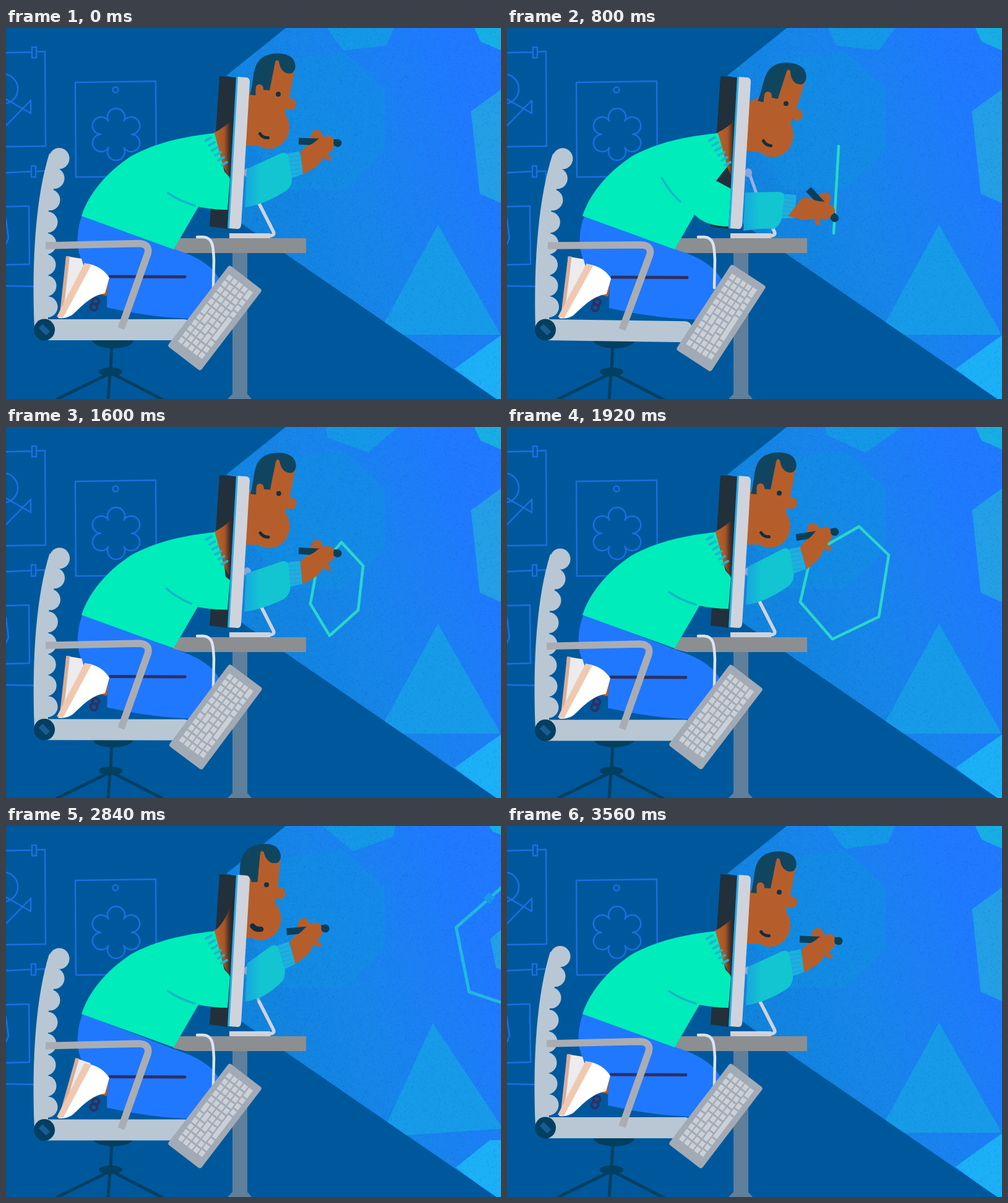
An HTML page with a canvas for the animation above (3.6 s loop, 800 by 600 pixels).

```html
<!DOCTYPE html>
<html lang="en">
<head>
<meta charset="utf-8">
<title>Drawing through the screen</title>
<style>
html, body { margin: 0; width: 100%; height: 100%; overflow: hidden; background: #00589c; }
canvas { display: block; }
</style>
</head>
<body>
<canvas id="stage" width="800" height="600"></canvas>
<script>
const LOOP = 3600, RAD = Math.PI / 180;
const stage = document.getElementById('stage').getContext('2d');
let c = stage;

const C = {
  wall: '#00589c', sketch: '#1a6fe0', navy: '#033f60', chair: '#b8c7d3', arm: '#a9adb3',
  skin: '#b65e2b', hair: '#104560', green: '#00ecba', jeans: '#2078ff', seam: '#302f63',
  teal: '#12c5d0', cuff: '#1bb0de', ink: '#2bd6c9', slab: '#d0d3db', panel: '#22303b', pen: '#0b3f59'
};

const clamp = x => Math.max(0, Math.min(1, x));
const mix = (a, b, u) => a + (b - a) * u;
const smooth = x => { x = clamp(x); return x * x * (3 - 2 * x); };

// Each key is [time, ...values]; values ease from key to key.
function track(keys, t) {
  let i = 0;
  while (i < keys.length - 2 && t >= keys[i + 1][0]) i++;
  const a = keys[i], b = keys[i + 1], u = smooth((t - a[0]) / (b[0] - a[0]));
  return a.slice(1).map((v, n) => mix(v, b[n + 1], u));
}

const shape = (d, color) => { c.fillStyle = color; c.fill(new Path2D(d)); };
function line(d, color, width, cap = 'round') {
  c.strokeStyle = color; c.lineWidth = width; c.lineCap = cap; c.lineJoin = 'round';
  c.stroke(new Path2D(d));
}
const toPath = pts => 'M' + pts.map(p => p.join(' ')).join('L') + 'Z';
function oval(x, y, rx, ry, color) {
  c.fillStyle = color; c.beginPath(); c.ellipse(x, y, rx, ry, 0, 0, 7); c.fill();
}
function ring(x, y, rx, ry, color, width) {
  c.strokeStyle = color; c.lineWidth = width; c.beginPath(); c.ellipse(x, y, rx, ry, 0, 0, 7); c.stroke();
}
function hexagon(x, y, r, deg) {
  return Array.from({ length: 6 }, (_, i) =>
    [x + r * Math.cos((deg + 60 * i) * RAD), y + r * Math.sin((deg + 60 * i) * RAD)]);
}
function placed(x, y, deg, ox, oy, draw) {
  c.save(); c.translate(x, y); c.rotate(deg * RAD); c.translate(-ox, -oy); draw(); c.restore();
}
function layer(draw) {
  const sheet = document.createElement('canvas');
  sheet.width = 800; sheet.height = 600;
  const old = c; c = sheet.getContext('2d'); draw(); c = old;
  return sheet;
}
let seed = 7;
const random = () => (seed = seed * 16807 % 2147483647) / 2147483647;

const BEAM = new Path2D('M452 0L356 77L372 81L364 305L800 605V0Z');
const HEAD_AREA = new Path2D('M340 0H520V240H366L380 80H340Z');

const wall = layer(() => {
  c.fillStyle = C.wall; c.fillRect(0, 0, 800, 600);
  const draw = d => line(d, C.sketch, 2.5);
  draw('M0 40L41 39M50 38.5L63 38L64 191L0 192M42 31H49V48H42Z');
  draw('M0 75A24 24 0 0 1 0 122M0 158L40 117V138L0 115');
  draw('M112 88L242 86L243 240L113 241Z');
  draw('M0 234L40 232M49 232L63 231V262M41 223H48V241H41Z');
  draw('M0 289L37 288L38 382L0 383M0 309L4 340L0 349M0 417L46 418');
  ring(177, 100, 4.5, 4.5, C.sketch, 2.5);
  const notches = hexagon(178, 172, 25, -120);
  draw('M' + notches[5].join(' ') + notches.map(p => 'A14 14 0 1 1 ' + p.join(' ')).join(''));
});

const beam = layer(() => {
  c.clip(BEAM);
  const g = c.createLinearGradient(390, 290, 760, 160);
  g.addColorStop(0, '#1184dc'); g.addColorStop(.45, '#1785ea'); g.addColorStop(1, '#2079ff');
  c.fillStyle = g; c.fillRect(0, 0, 800, 600);
  c.globalAlpha = .5;
  shape('M430 55L545 37L612 98V198L548 262L450 262L400 190Z', '#1192e2');
});

const grain = layer(() => {
  c.clip(BEAM);
  for (let i = 0; i < 26000; i++) {
    const x = 360 + 440 * Math.pow(random(), 1.5), y = 600 * random();
    c.fillStyle = random() < .5 ? 'rgba(0,70,190,.13)' : 'rgba(40,180,235,.13)';
    c.fillRect(x, y, 1.5, 1.5);
  }
});

// time, lean, head x, head y, head turn, wrist x, wrist y, wrist turn, sleeve y, hand turn, chair drop
const POSES = [
  [0, 0, 0, 0, 0, 478, 218, -8, 228, 0, 0],
  [340, .2, 2, 2, 1, 470, 203, -8, 228, 18, 0],
  [700, 1, 10, 15, 6.5, 463, 308, 9, 272, 45, 0],
  [800, 1, 9.5, 14, 6.5, 466, 289, 8, 266, 45, 0],
  [1280, .3, 1.5, 1, .5, 476, 259, 2, 248, 13, 0],
  [1920, 0, 0, 0, 0, 479, 212, -9, 226, -11, 2.5],
  [2320, 0, 0, 0, 0, 478, 217, -9, 227, -17.5, 3.5],
  [2840, 0, -17.5, -11, -6, 463, 205, -16, 222, -7.5, 3.5],
  [3560, 0, 0, 0, 0, 478, 218, -8, 228, 0, 0],
  [3600, 0, 0, 0, 0, 478, 218, -8, 228, 0, 0]
];

// Corners of the drawn outline, clockwise from the top.
const OUTLINE = [
  [820, 536, 191, 535, 225, 530, 300, 528, 332, 530, 300, 535, 225],
  [1280, 515, 212, 537, 242, 537, 285, 520, 332, 510, 289, 511, 262],
  [1920, 569, 161, 617, 207, 601, 307, 526, 343, 474, 283, 492, 205],
  [2320, 583, 145, 670, 195, 670, 296, 583, 346, 496, 296, 496, 195]
];

// Flight of the finished outline: time, x, y, radius, turn
const FLIGHT = [
  [2360, 583, 245.5, 100.5, 210],
  [2840, 828, 198, 106, 198.6],
  [3300, 874, 189, 134, 203.9]
];

function drawBeam(t) {
  c.drawImage(beam, 0, 0);
  c.save(); c.clip(BEAM);
  const push = t < 2840 ? smooth((t - 2380) / 460) : 1 - smooth((t - 2840) / 640);
  shape(toPath(hexagon(573, -28, 70, 53 + t / 60)), '#1597e8');
  placed(705, 437, -4 * push, 705, 437, () => shape('M698 318L601 496H799.5Z', '#179be8'));
  shape(`M${725 + 2 * push} ${551 + push}L${790 - 8 * push} ${504 + 4 * push}L815 ${487 + 21 * push}V620Z`, '#1cb0f7');
  placed(18 * push, -14 * push, 0, 0, 0, () => shape('M755 -4L767 22L802 37V-4Z', '#17aee4'));
  if (t < 2760) {
    const away = 170 * smooth((t - 2360) / 360);
    shape(toPath(hexagon(874 + away, 189, 134, 203.9)), '#239fe6');
  }
  if (t >= 2360) {
    const [x, y, r, turn] = track(FLIGHT, t), fill = clamp((t - 2640) / 445);
    if (fill) shape(toPath(hexagon(x, y, r * fill, turn)), '#239fe6');
    c.globalAlpha = 1 - smooth((t - 2900) / 300);
    line(toPath(hexagon(x, y, r, turn)), t < 2600 ? C.ink : '#20bade', 5);
    c.globalAlpha = 1;
    if (t > 2740 && t < 2940) {
      placed(781, 116, 42, 0, 0, () => { c.fillStyle = '#179be8'; c.fillRect(-6, -6, 13, 13); });
    }
  }
  c.drawImage(grain, 0, 0);
  c.restore();

  if (t >= 340 && t < 820) {
    const u = smooth((t - 340) / 360);
    line(`M536 191L${mix(536, 528, u)} ${mix(191, 332, u)}`, C.ink, 4.5);
  } else if (t >= 820 && t < 2360) {
    const p = track(OUTLINE, t);
    line(toPath([0, 2, 4, 6, 8, 10].map(i => [p[i], p[i + 1]])), C.ink, 4.5);
  }
}

function drawBase() {
  oval(173, 505, 33, 13, C.navy);
  line('M171 512L169 552M169 558L83 600M168 558L165 602M170 558L255 602', C.navy, 5);
  oval(169, 556, 19, 7, C.navy);
}

function drawChair() {
  shape('M70 203C49 270 41 370 46 488H68V300L86 220Z', C.chair);
  [[86, 211], [78, 243], [71, 278], [67, 314], [65, 349], [64, 383], [65, 417], [67, 451]]
    .forEach(([x, y]) => oval(x, y, 16.5, 17, C.chair));
  shape('M48 471H288Q300 472 300 488Q300 505 288 505H62Z', C.chair);
  oval(62, 488, 17, 17.5, C.navy);
  line('M56 482L68 494', '#185c96', 9, 'butt');
}

function drawDesk() {
  shape('M366 360H390V592L397 600H358L366 592Z', '#5f7f9b');
  shape('M281 340H485V364H290L270 359Z', '#8b8f92');
  line('M392 236L409 284', '#8fb2ec', 5);
  oval(390, 234, 6, 7, '#8aa6da');
  line('M409 284L432 329Q435 335 427 336H364', C.slab, 5.5);
  c.fillStyle = C.slab; c.fillRect(361, 332, 66, 8);
}

function drawHead([, x, y, turn], sway) {
  c.save(); c.clip(HEAD_AREA);
  placed(430 + x, 120 + y, turn, 430, 120, () => {
    shape('M397 100L424 62L438 48L467 66L457.5 114L450 140L440 190H380V112Z', C.skin);
    oval(425, 160, 33, 35.5, C.skin);
    oval(460, 123, 9, 9.5, C.skin);
    shape('M394 108C400 92 398 66 408 54C419 38 452 37 463 49C470 58 469 69 462 73C451 76 443 68 441 54' +
      'Q437 49 435 56L426 101L415 100L404 109Z', C.hair);
    shape('M403.5 110V98Q404 91 410 91Q416 92 416 99L417 110Z', C.skin);
    oval(440, 107, 4, 4, '#123247');
    line('M410.5 171Q415 178 423.5 177.5', '#122e3d', 5 + sway * .2);
  });
  c.restore();
}

function drawBody(pose, swing, sway) {
  const lean = pose[0], drop = pose[9];
  shape('M345 78L372 80L358 325L329 321Z', C.panel);

  const shade = c.createLinearGradient(342, 0, 366, 0);
  shade.addColorStop(0, C.skin); shade.addColorStop(.45, '#a85627');
  shade.addColorStop(.8, '#3f2e2a'); shade.addColorStop(1, '#22282e');
  placed(4 * lean, 0, 0, 0, 0, () =>
    shape(`M335 170Q355 160 ${367 + sway * .1} ${146 - sway * 2}L366 160L361 243L350 222Z`, shade));

  placed(2 * lean, drop + lean, 0, 0, 0, () => {
    shape('M124 300C111 333 114 365 127 384L164 402L163 452C210 462 250 469 315 471L346 408C335 386 312 370 270 357Z', C.jeans);
    line('M168 402L289 402.5', C.seam, 5);
  });

  const pit = [mix(311, 303, lean), mix(289, 302, lean)], low = mix(294, 321, swing * swing);
  shape(`M122 304C134 268 161 235 201 208C242 185 290 175 ${337 + 4 * lean} 170` +
    `L${mix(353, 356, swing)} ${mix(232, 224, swing)}L${mix(360, 338, swing)} ${mix(240, 247, swing)}L362 ${mix(244, 260, swing)}` +
    `L358 ${low}Q${mix(335, 322, lean)} ${low} ${pit.join(' ')}L271 358Z`, C.green);
  const fx = mix(262, 250, swing), fy = mix(267, 242, swing), gx = mix(305, 280, swing), gy = mix(287, 281, swing);
  line(`M${fx} ${fy}Q${(fx + gx) / 2 - 3} ${(fy + gy) / 2 + 3} ${gx} ${gy}`, '#16b6cb', 3.5);
  for (let i = 0; i < 6; i++) {
    const x = 323 + 5 * i + 4 * lean, y = 182 + 8 * i;
    line(`M${x} ${y}l9 -5`, '#1cb4d5', 4);
  }
}

function drawShoes(sway) {
  shape('M157 402L166 405L163 433L153 431Z', C.skin);
  placed(88, 462, sway * .55, 88, 462, () => {
    shape('M97 369L122 373L128 392L92 448Z', '#ecebed');
    shape('M97 369L103 369L95 440L87 462Z', '#d8ad99');
  });
  shape('M130 381C147 383 160 392 167 404L160 429C135 433 119 454 107 464Q96 471 84 469Z', '#fff');
  shape('M127 380L138 383L92 469L82 467Z', '#f0c8b0');
  ring(145, 442, 5.5, 5, C.seam, 4);
  ring(142, 451, 5.5, 5.5, C.seam, 4);
}

function drawScreen() {
  shape('M372 79H377L364 324H358Z', '#27aee6');
  shape('M375 79L389 80Q394 81 394 87L380 319Q379 325 374 325L361 324Z', C.slab);
}

function drawKeyboard(lean) {
  line('M309 338H319C334 339 335 352 336 375L335 420', '#dce3f1', 4.5);
  placed(337.5 + 8.5 * lean, 469, 127.4 - 4.4 * lean, 0, 0, () => {
    c.fillStyle = '#a2abb5';
    c.beginPath(); c.roundRect(-82.5, -33.5, 165, 67, 4); c.fill();
    c.fillStyle = '#cbd0d7';
    for (let row = 0; row < 5; row++) {
      for (let x = -70, n = 0; x < 66; n++) {
        const wide = row === 0 && n === 4 ? 44 : (n + row) % 9 === 0 ? 16 : 9;
        const w = Math.min(wide, 70 - x);
        c.fillRect(x, -24 + row * 10.2, w, 7.8);
        x += w + 3;
      }
    }
  });
}

function drawArm(pose) {
  const [wx, wy, turn, sy, hand] = pose.slice(4, 9);
  const cos = Math.cos(turn * RAD), sin = Math.sin(turn * RAD);
  const at = (x, y) => `${wx + x * cos - y * sin} ${wy + x * sin + y * cos}`;
  const left = mix(389, 385, (sy - 228) / 38);

  const tint = c.createLinearGradient(left, 0, left + 22, 0);
  tint.addColorStop(0, '#17a9de'); tint.addColorStop(1, C.teal);
  shape(`M${left} ${sy}L${at(-30, -20)}Q${at(-20, -21)} ${at(-19, -12)}L${at(-19, 20)}Q${at(-20, 35)} ${at(-31, 41)}` +
    `Q${left + 30} ${sy + 57} ${left - 3} ${sy + 62}Z`, tint);
  shape(`M${at(-20, -18)}L${at(-1, -19)}L${at(1, 18)}L${at(-19, 22)}Z`, C.cuff);
  for (let y = -12; y < 18; y += 7) line(`M${at(-19, y)}L${at(-3, y)}`, '#24a1dd', 1.8);

  // The thumb lies behind the pen, the fingers in front of it.
  placed(wx, wy, hand, 0, 0, () => {
    shape('M8 -29L15 -44Q15 -51 23 -53Q32 -54 33 -45L42 -34Z', C.skin);
    line('M-5 -35L56 -32.5', C.pen, 11, 'butt');
    oval(58, -32, 6.5, 6.5, C.pen);
    shape('M-2 -18L8 -27Q18 -30 25 -37Q35 -44 46 -43Q54 -40 51 -32Q55 -23 46 -18Q41 -15 43 -13' +
      'Q50 -8 48 -4Q43 -2 35 -9Q31 1 21 8L2 19Z', C.skin);
  });
}

function render(t) {
  const pose = track(POSES, t), lean = pose[0], swing = clamp((pose[7] - 228) / 38);
  const sway = Math.max(0, -pose[1]);
  const seated = draw => placed(62, 488 + pose[9], .8 * lean, 62, 488, draw);
  c.drawImage(wall, 0, 0);
  drawBeam(t);
  drawBase();
  seated(drawChair);
  drawDesk();
  drawBody(pose, swing, sway);
  seated(() => {
    drawShoes(sway);
    line('M64 352L214 348.5Q233 349 229 365L186 486', C.arm, 11.5, 'butt');
  });
  drawHead(pose, sway);
  drawScreen();
  drawKeyboard(lean);
  drawArm(pose);
}

function tick() {
  render(performance.now() % LOOP);
  requestAnimationFrame(tick);
}
tick();
</script>
</body>
</html>
```
